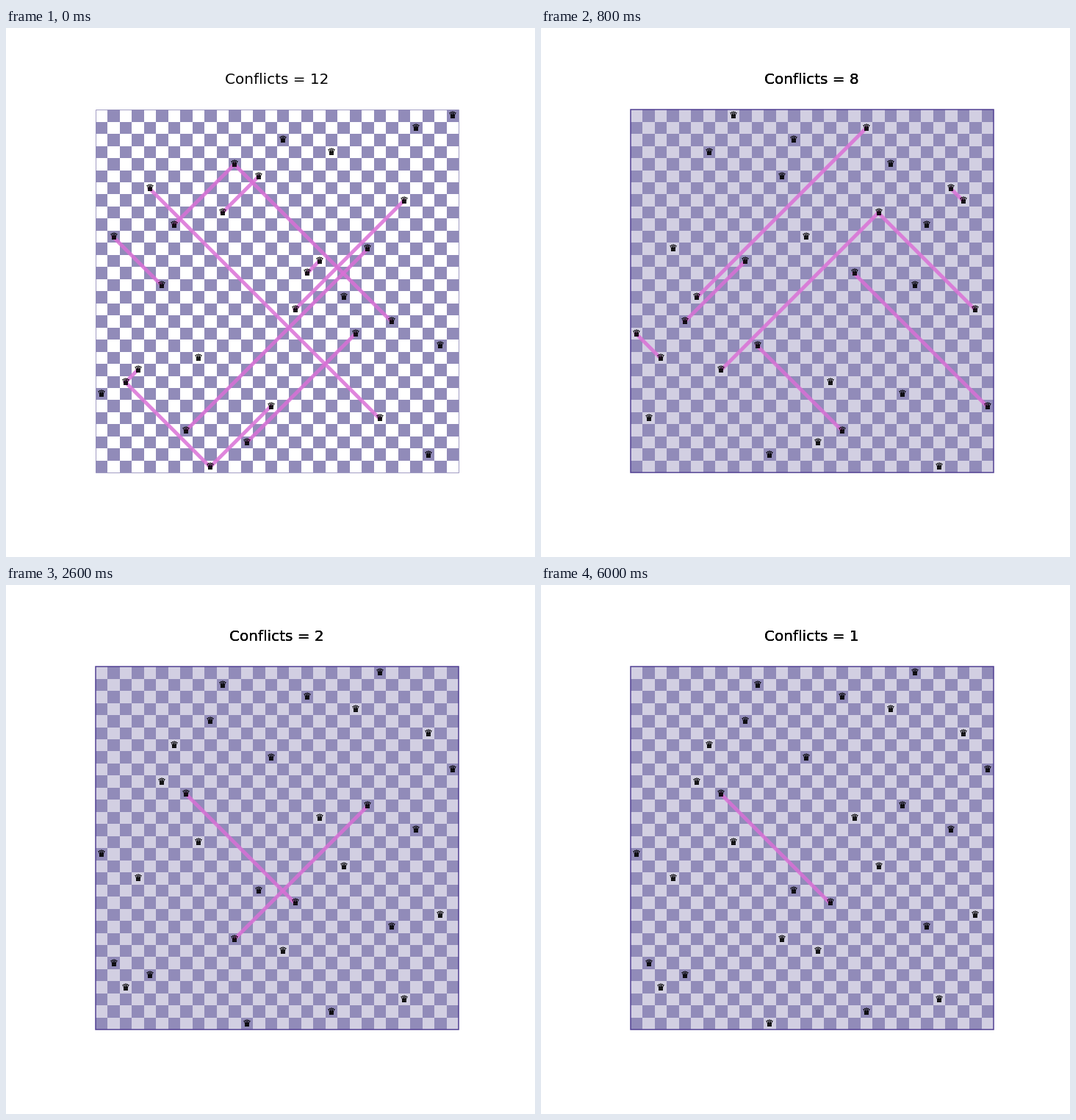
These frames come from a looping animation (720 by 720 pixels, 8000 ms). A matplotlib script:

```python
import random
from itertools import combinations

import matplotlib.pyplot as plt
import numpy as np
from matplotlib.animation import FuncAnimation
from matplotlib.collections import LineCollection
from matplotlib.patches import Rectangle

N = 30
CELL = 16.472
STEP = 200  # ms per frame
FRAMES = 40

DARK = (145 / 255, 139 / 255, 185 / 255)
PALE = (210 / 255, 207 / 255, 226 / 255)
BORDER = "#503f92"


def center(col, row):
    return 129.62 + col * CELL, 119.79 + row * CELL


def conflicts(rows):
    return [(a, b) for a, b in combinations(range(N), 2)
            if abs(rows[a] - rows[b]) == b - a]


def swapped(rows, *pairs):
    rows = list(rows)
    for a, b in pairs:
        rows[a], rows[b] = rows[b], rows[a]
    return rows


def search(rng, target):
    """Swap random queens until the board has the wanted conflict count."""
    rows = rng.sample(range(N), N)
    count = len(conflicts(rows))
    while count != target:
        trial = swapped(rows, rng.sample(range(N), 2))
        n = len(conflicts(trial))
        if target <= n <= count or count < target <= n:
            rows, count = trial, n
    return rows


# row of the queen in each column, at the start and at the end
first = [23, 10, 22, 21, 6, 14, 9, 26, 20, 29, 8, 4, 27, 5, 24,
         2, 16, 13, 12, 3, 15, 18, 11, 25, 17, 7, 1, 28, 19, 0]
best = [15, 24, 26, 17, 25, 9, 6, 10, 14, 4, 1, 29, 22, 18, 7,
        23, 19, 2, 12, 28, 16, 3, 11, 0, 21, 27, 13, 5, 20, 8]

# start time in ms -> arrangement shown from then on
rng = random.Random(7)
timeline = {0: first}
for k, count in enumerate((9, 9, 8, 8, 7)):
    timeline[STEP * (k + 1)] = search(rng, count)

# the final approach, undone swap by swap from the best board
rows = best
timeline[3000] = best
for start, pair in ((2600, (11, 12)), (2200, (20, 28)),
                    (1800, (3, 19)), (1200, (8, 20))):
    rows = swapped(rows, pair)
    timeline[start] = rows

# short trials that are taken back
for start, end, pairs in ((4800, 5000, [(1, 17)]),
                          (5200, 5400, [(1, 17), (0, 4)]),
                          (5800, 6000, [(1, 2)])):
    timeline[start] = swapped(best, *pairs)
    timeline[end] = best

plt.rcParams["font.family"] = "DejaVu Sans"
fig = plt.figure(figsize=(6, 6), dpi=120, facecolor="white")
ax = fig.add_axes([0, 0, 1, 1])
ax.axis("off")

# cell edges lie on whole pixels
xs = np.round(121.92 + CELL * np.arange(N + 1))
ys = np.round(111.15 + CELL * np.arange(N + 1))
light = [ax.add_patch(Rectangle((xs[0], ys[0]), xs[-1] - xs[0],
                                ys[-1] - ys[0], linewidth=0))][0]
odd = np.add.outer(np.arange(N), np.arange(N)) % 2 == 1
for r, c in np.argwhere(odd):
    ax.add_patch(Rectangle((xs[c], ys[r]), xs[c + 1] - xs[c],
                           ys[r + 1] - ys[r], facecolor=DARK, linewidth=0))
border = ax.add_patch(Rectangle((xs[0], ys[0]), xs[-1] - xs[0],
                                ys[-1] - ys[0], fill=False))
ax.set_xlim(0, 720)
ax.set_ylim(720, 0)

lines = LineCollection([], colors="orchid", linewidths=3, alpha=0.85,
                       capstyle="projecting", zorder=2)
ax.add_collection(lines, autolim=False)


def label(text, size, copies, va):
    """Stacked copies of one text give it heavier edges."""
    return [ax.text(368.46, 76.4, text, size=size, ha="center", va=va)
            for _ in range(copies)]


queens = [label("\u265b", 8, 2, "center") for _ in range(N)]
titles = label("", 12, 3, "baseline")


def draw(i):
    start = max(t for t in timeline if t <= i * STEP)
    rows = timeline[start]
    pairs = conflicts(rows)
    opening = start == 0

    light.set_facecolor("white" if opening else PALE)
    border.set_edgecolor(DARK if opening else BORDER)
    border.set_linewidth(0.5 if opening else 0.9)
    lines.set_segments([[center(c, rows[c]) for c in pair] for pair in pairs])
    for col, stack in enumerate(queens):
        for queen in stack:
            queen.set_position(center(col, rows[col]))
    for k, title in enumerate(titles):
        title.set_text(f"Conflicts = {len(pairs)}")
        title.set_visible(k == 0 or not opening)
    return [light, border, lines, *sum(queens, []), *titles]


anim = FuncAnimation(fig, draw, frames=FRAMES, interval=STEP,
                     repeat=True, repeat_delay=0, blit=False)
plt.show()
```
